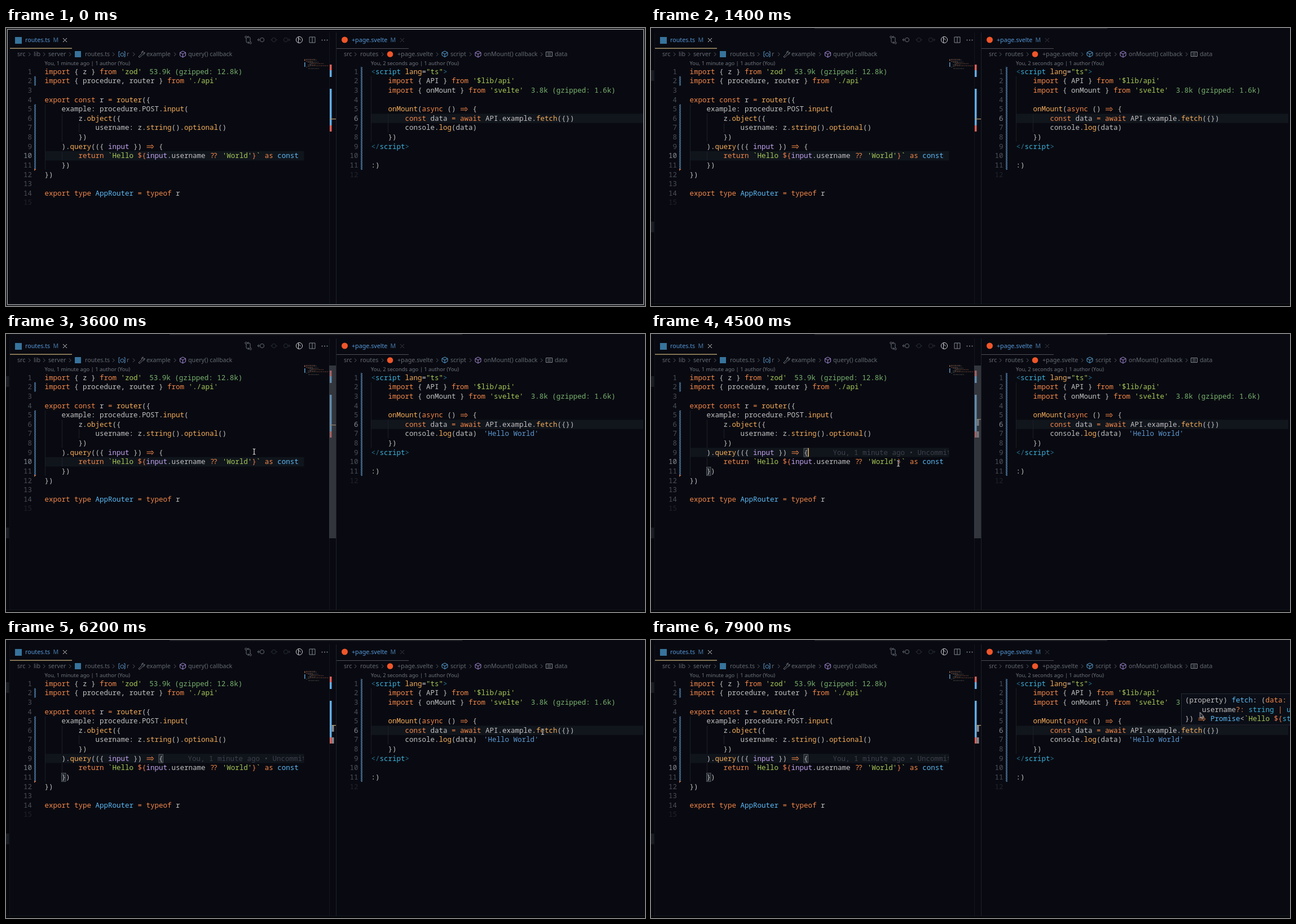
These frames come from a looping animation (1133 px wide and 494 px high, 8 s). An HTML page:

```html
<!DOCTYPE html>
<html lang="en">
<head>
<meta charset="utf-8">
<title>Typed API demo</title>
<style>
html, body { margin: 0; width: 100%; height: 100%; overflow: hidden; background: #090a11; }
svg { display: block; width: 1133px; height: 494px; }
text { white-space: pre; }
.code { font: 12.5px "Noto Sans Mono", "DejaVu Sans Mono", monospace; }
.ui { font: 10.7px "Noto Sans", "Open Sans", sans-serif; }
.small { font-size: 9.4px; }
.line { fill: none; stroke-width: 1; }
</style>
</head>
<body>
<svg id="stage" viewBox="0 0 1133 494" xmlns="http://www.w3.org/2000/svg"></svg>
<script>
const LOOP = 8000, CHAR = 7.5, PITCH = 16.62;
const LEFT = 68.5, RIGHT = 647.5;

// A code line switches colour at "~" followed by one of these keys.
const COLORS = {
  w: '#c1c1c3', o: '#f48849', y: '#f4ad59', g: '#a8c957', s: '#79b36f',
  b: '#5bb9f5', p: '#c0a2ee', r: '#f17c4b', t: '#277594', n: '#3cb2dc',
  l: '#5d9ad4', d: '#3d414b'
};

const leftCode = [
  "~oimport ~w{ z } ~ofrom ~g'zod'  ~s53.9k (gzipped: 12.8k)",
  "~oimport ~w{ procedure, router } ~ofrom ~g'./api'",
  "",
  "~oexport const ~wr ~o= ~yrouter~w({",
  "    ~wexample: procedure.POST.~yinput~w(",
  "        ~wz.~yobject~w({",
  "            ~wusername: z.~ystring~w().~yoptional~w()",
  "        ~w})",
  "    ~w).~yquery~w(({ ~pinput ~w}) ~o=> ~w{",
  "        ~oreturn ~g`Hello ~r${~pinput~w.username ~o?? ~g'World'~r}~g` ~oas ~bconst",
  "    ~w})",
  "~w})",
  "",
  "~oexport type ~bAppRouter ~o= typeof ~wr",
  ""
];
const rightCode = [
  "~t<~nscript ~ylang~w=~g\"ts\"~t>",
  "    ~oimport ~w{ API } ~ofrom ~g'$lib/api'",
  "    ~oimport ~w{ onMount } ~ofrom ~g'svelte'  ~s3.8k (gzipped: 1.6k)",
  "",
  "    ~yonMount~w(~oasync ~w() ~o=> ~w{",
  "        ~oconst ~wdata ~o= await ~wAPI.example.~yfetch~w({})",
  "        ~wconsole.~ylog~w(data)",
  "    ~w})",
  "~t</~nscript~t>",
  "",
  "~w:)",
  ""
];

const baseline = n => 81.7 + PITCH * (n - 1);
const rowTop = n => 69.2 + PITCH * (n - 1);
const escape = s => s.replace(/&/g, '&amp;').replace(/</g, '&lt;');
const rect = (x, y, w, h, fill, extra = '') =>
  `<rect x="${x}" y="${y}" width="${w}" height="${h}" fill="${fill}" ${extra}/>`;
const path = (d, stroke, extra = '') => `<path class="line" d="${d}" stroke="${stroke}" ${extra}/>`;
const label = (x, y, text, fill, extra = '') =>
  `<text class="ui ${extra}" x="${x}" y="${y}" fill="${fill}">${escape(text)}</text>`;
const group = (id, body) => `<g id="${id}">${body}</g>`;

// "=>" and "??" are drawn the way a coding font joins them.
const nullish = '<tspan dx="1">?</tspan><tspan dx="-2">?</tspan><tspan dx="1"> </tspan>';

function codeLine(x, y, source) {
  let column = 0, key = 'w', spans = '', arrows = '';
  source.split(/(~[a-z])/).forEach(part => {
    if (/^~[a-z]$/.test(part)) { key = part[1]; return; }
    const at = part.indexOf('=>');
    if (at >= 0) {
      const left = x + (column + at) * CHAR + 1;
      arrows += path(`M${left} ${y - 5.4}h10.5M${left} ${y - 2.4}h10.5M${left + 8.5} ${y - 7.6}l4 3.7l-4 3.7`, COLORS[key], 'stroke-width="1.1"');
    }
    const body = escape(part.replace('=>', '  ')).replace('?? ', nullish);
    spans += `<tspan fill="${COLORS[key]}" dx="${key === 's' ? -1.8 : 0}">${body}</tspan>`;
    column += part.length;
  });
  return `<text class="code" x="${x}" y="${y}">${spans}</text>${arrows}`;
}

function editor(lines, x, numberRight, current) {
  return lines.map((line, i) => {
    const n = i + 1;
    const fill = n === lines.length ? '#20232b' : n === current ? '#858a94' : '#4b4f59';
    return `<text class="code" text-anchor="end" x="${numberRight}" y="${baseline(n)}" fill="${fill}">${n}</text>`
      + codeLine(x, baseline(n), line);
  }).join('');
}

const guide = (x, from, to) => rect(x, rowTop(from), 1, PITCH * (to - from + 1), '#1b1e27');
const hatch = (x, from, to) => rect(x, rowTop(from), 3, PITCH * (to - from + 1), 'url(#hatch)');
const cube = (x, y) => path(`M${x} ${y - 5.5}l5 2.6v5.6l-5 2.8l-5 -2.8v-5.6zM${x - 5} ${y - 2.9}l5 2.7l5 -2.7M${x} ${y - .2}v5.7`, '#a58bd8');
const chevron = x => path(`M${x - 2} 43.5l3.2 3.2l-3.2 3.2`, '#5a5e68');
const cross = (x, color) => path(`M${x - 3.5} 18l7 7m0 -7l-7 7`, color, 'stroke-width="1.2"');
const dot = (x, y, r) => `<circle cx="${x}" cy="${y}" r="${r}" fill="#f0562a"/>`;

function toolbar() {
  const gray = '#686c76', dim = '#2a2d36';
  const ring = (x, color, arms) => `<circle class="line" cx="${x}" cy="21" r="3.6" stroke="${color}"/>` + path(arms, color);
  return path('M426 17v7q0 2 2 2h3m-2 -2l2 2l-2 2M433 25v-7q0 -2 -2 -2h-3m2 -2l-2 2l2 2', gray)
    + `<circle class="line" cx="425.5" cy="16" r="1.7" stroke="${gray}"/><circle class="line" cx="433.5" cy="26.5" r="1.7" stroke="${gray}"/>`
    + ring(454, gray, 'M450 21h-4m2.5 -2.5l-2.5 2.5l2.5 2.5')
    + ring(475, dim, 'M469 21h2.4m7.2 0h2.4')
    + ring(496, dim, 'M499.6 21h4m-2.5 -2.5l2.5 2.5l-2.5 2.5')
    + '<circle class="line" cx="520" cy="21" r="5.6" stroke="#c9cbd0"/>'
    + path('M518.5 16v10M518.5 18l4 3.5', '#c9cbd0', 'stroke-width="1.4"')
    + path('M538 16h10v10h-10zM543 16v10', '#858993')
    + [560.5, 565, 569.5].map(x => `<circle cx="${x}" cy="21.5" r="1" fill="#858993"/>`).join('');
}

function header() {
  const muted = '#656973', blue = '#5598d8';
  const crumbs = [[20, 'src'], [49, 'lib'], [75, 'server'], [140, 'routes.ts'], [214, 'r'], [249, 'example'],
    [323, 'query() callback'], [599, 'src'], [628, 'routes'], [694, '+page.svelte'], [788, 'script'],
    [847, 'onMount() callback'], [973, 'data']];
  return rect(7, 35.5, 110, 1.3, '#c4a877') + rect(586, 36, 128, 1, '#4c4e56')
    + rect(16, 16, 12, 12, '#37739c') + label(34, 25.3, 'routes.ts', blue) + label(83.5, 25.3, 'M', '#4778a8') + cross(104.5, '#d0d2d7')
    + dot(600.5, 21, 5.5) + label(613, 25.3, '+page.svelte', blue) + label(681.5, 25.3, 'M', '#4778a8') + cross(702.5, '#393c45')
    + crumbs.map(([x, text]) => label(x, 50.3, text, muted)).join('')
    + [42, 68, 114, 191, 227, 300, 620, 668, 765, 824, 950].map(chevron).join('')
    + rect(122, 41, 11, 11, '#37739c') + dot(681, 46.5, 5.3) + cube(313.5, 46.5) + cube(837, 46.5)
    + path('M202 42h-2v9h2m7 -9h2v9h-2M203 46l3 -2l3 2v2.5l-3 2l-3 -2z', '#5796c9')
    + path('M235 51l5.5 -5.5q-1 -4 3 -4.5l-1.5 2.5l2 1.5l2 -2q.5 4 -4 4.5l-5 5z', '#777b84')
    + path('M778 41l5 2.5v5l-5 3l-5 -3v-5zM773 43.5l5 2.8l5 -2.8M778 46.3v5', '#5ba4d8')
    + path('M957.5 42.5h11v8h-11zM960 45h6m-6 3h6', '#858993')
    + label(68.5, 66.2, 'You, 1 minute ago | 1 author (You)', '#70747e', 'small')
    + label(647, 66.2, 'You, 2 seconds ago | 1 author (You)', '#70747e', 'small');
}

function minimap() {
  const rows = [[0, 17], [0, 19], [0, 0], [0, 12], [3, 19], [6, 8], [9, 22], [6, 3], [3, 14], [6, 34], [3, 3], [0, 2], [0, 0], [4, 19]];
  return rows.map(([x, w], i) => w ? `<path d="M${532 + x} ${55.8 + i * 1.25}h${w}" stroke="${i % 3 ? '#777069' : '#a4674a'}" stroke-width=".8" stroke-dasharray="3 1 2 .7" opacity=".75"/>` : '').join('')
    + rect(529, 55.5, 1.5, 3, '#a4674a') + rect(529, 61, 1.5, 8, '#5f9bc8');
}

const ruler = rect(574, 65, 3.5, 10, '#e0605b') + rect(574, 75, 3.5, 12, '#62aee8')
  + rect(574, 108, 3.5, 65, '#62aee8') + rect(574, 173, 3.5, 11, '#e0605b');

const bracket = (x, n) => rect(x, rowTop(n) + 1, 7.5, 15, '#20252c', 'stroke="#666b72" stroke-width=".8"');
const bracketMark = y => rect(577.5, y, 4, 11, '#85888d');

const hover = rect(940.5, 95.5, 200, 55.5, '#0b0e16', 'stroke="#262a34"')
  + codeLine(947, 111.2, '~w(property) ~bfetch~w: (~odata:')
  + codeLine(947, 127.8, '    ~wusername~o?: ~nstring ~o| ~nundefined')
  + codeLine(947, 144.4, '~w}) ~o=> ~bPromise~w<~g`Hello ~r${~nstring~r}~g`');

const beam = 'M-2.3 -5q2.3 0 2.3 1.2q0 -1.2 2.3 -1.2M0 -4v8M-2.3 5q2.3 0 2.3 -1.2q0 1.2 2.3 1.2';

document.getElementById('stage').innerHTML = `
  <defs>
    <pattern id="hatch" width="3" height="3" patternUnits="userSpaceOnUse">
      <path d="M-1 1l2 -2M0 3l3 -3M2 4l2 -2" stroke="#67a5dd" stroke-width="1.1"/>
    </pattern>
    <clipPath id="leftPane"><rect x="60" y="60" width="468" height="400"/></clipPath>
  </defs>`
  + rect(0, 0, 1133, 494, '#090a11') + rect(0, 0, 6, 494, '#07080d')
  + rect(0, 490, 1133, 4, '#040508') + rect(0, 490, 1133, 1, '#15171e')
  + group('edges', rect(290, 0, 519, 1.5, '#24262d') + rect(0, 75, 5.5, 19, '#1b1d24') + rect(0, 344, 5.5, 19, '#1b1d24'))
  + rect(6, 8, 1, 482, '#101219') + rect(573, 8, 1, 482, '#14161e') + rect(585, 8, 1, 482, '#20222a')
  + group('rowTen', rect(69, rowTop(10), 459.5, PITCH, '#10151c'))
  + group('rowNine', rect(69, rowTop(9), 459.5, PITCH, '#10141b') + bracket(271, 9) + bracket(98.5, 11))
  + rect(647, rowTop(6), 483, PITCH, '#11151c')
  + group('word', rect(940, rowTop(6), 37.5, PITCH, '#1b2028'))
  + guide(69, 5, 11) + guide(99, 6, 8) + guide(99, 10, 10) + guide(129, 7, 7)
  + guide(647, 2, 8) + guide(677, 6, 7)
  + hatch(50, 2, 2) + hatch(50, 5, 11) + hatch(629, 1, 11)
  + '<path d="M50 254v-3.5h3.5z" fill="#d8774d"/>'
  + header() + toolbar() + minimap() + ruler
  + group('markTen', rect(574, 161, 11, 1.3, '#b39b72'))
  + group('markNine', bracketMark(152) + bracketMark(173) + rect(577.5, 151, 7.5, 1.3, '#b39b72'))
  + group('scrollbar', rect(573, 56, 12, 307, '#60646e', 'opacity=".48"'))
  + editor(leftCode, LEFT, 46, 10) + editor(rightCode, RIGHT, 624.5, 6)
  + group('ghost', `<g clip-path="url(#leftPane)">${codeLine(322.5, baseline(9), '~dYou, 1 minute ago • Uncommitted changes')}</g>`)
  + group('caret', rect(278.3, rowTop(9) + .5, 1.5, 15.5, '#e5b355'))
  + group('output', codeLine(847, baseline(7), "~l'Hello World'"))
  + group('hover', hover)
  + group('mouse',
      group('beam', path(beam, '#05060a', 'style="stroke-width:3"') + path(beam, '#e8e8ea', 'style="stroke-width:1.2"'))
      + group('arrow', '<path d="M0 -5.5v10l2.2 -1.6l1.5 3.3l1.6 -.8l-1.5 -3.2h2.9z" fill="#16181e" stroke="#d8dade" stroke-width=".9"/>'))
  + group('frame', rect(1, 1, 1131, 492, 'none', 'stroke="#1f2023" stroke-width="2"')
      + rect(2.5, 2.5, 1128, 489, 'none', 'stroke="#b9babd"'));

function animate(id, property, steps, easing) {
  const frames = steps.map(([time, value]) => ({ offset: time / LOOP, [property]: value, easing }));
  frames.push({ ...frames[frames.length - 1], offset: 1 });
  document.getElementById(id).animate(frames, { duration: LOOP, iterations: Infinity });
}

function show(id, from, to = LOOP) {
  const steps = from ? [[0, 0], [from, 1]] : [[0, 1]];
  if (to < LOOP) steps.push([to, 0]);
  animate(id, 'opacity', steps, 'steps(1, end)');
}

const CLICK = 4300;
show('frame', 0, 100);
show('edges', 100);
show('output', 2800);
['rowTen', 'markTen'].forEach(id => show(id, 0, CLICK));
['rowNine', 'markNine', 'ghost'].forEach(id => show(id, CLICK));
['hover', 'word'].forEach(id => show(id, 6800));
show('mouse', 2900);
show('beam', 0, 7600);
show('arrow', 7600);

const blinks = Array.from({ length: 8 }, (_, i) => [CLICK + i * 500, i % 2 ? 0 : 1]).filter(([t]) => t < LOOP);
animate('caret', 'opacity', [[0, 0], ...blinks], 'steps(1, end)');
animate('scrollbar', 'opacity', [[0, 0], [2900, 0], [3000, 1], [4900, 1], [5400, 0]], 'linear');

const stops = [[0, 458, 478], [2900, 458, 478], [3300, 442, 270], [3550, 440, 209], [4320, 440, 209],
  [4480, 438.5, 230], [4700, 438.5, 230], [5050, 690, 196], [5400, 935, 168], [5900, 951.5, 163],
  [7300, 951.5, 163], [7750, 973.5, 134]];
animate('mouse', 'transform', stops.map(([t, x, y]) => [t, `translate(${x}px, ${y}px)`]), 'ease-in-out');
</script>
</body>
</html>
```
